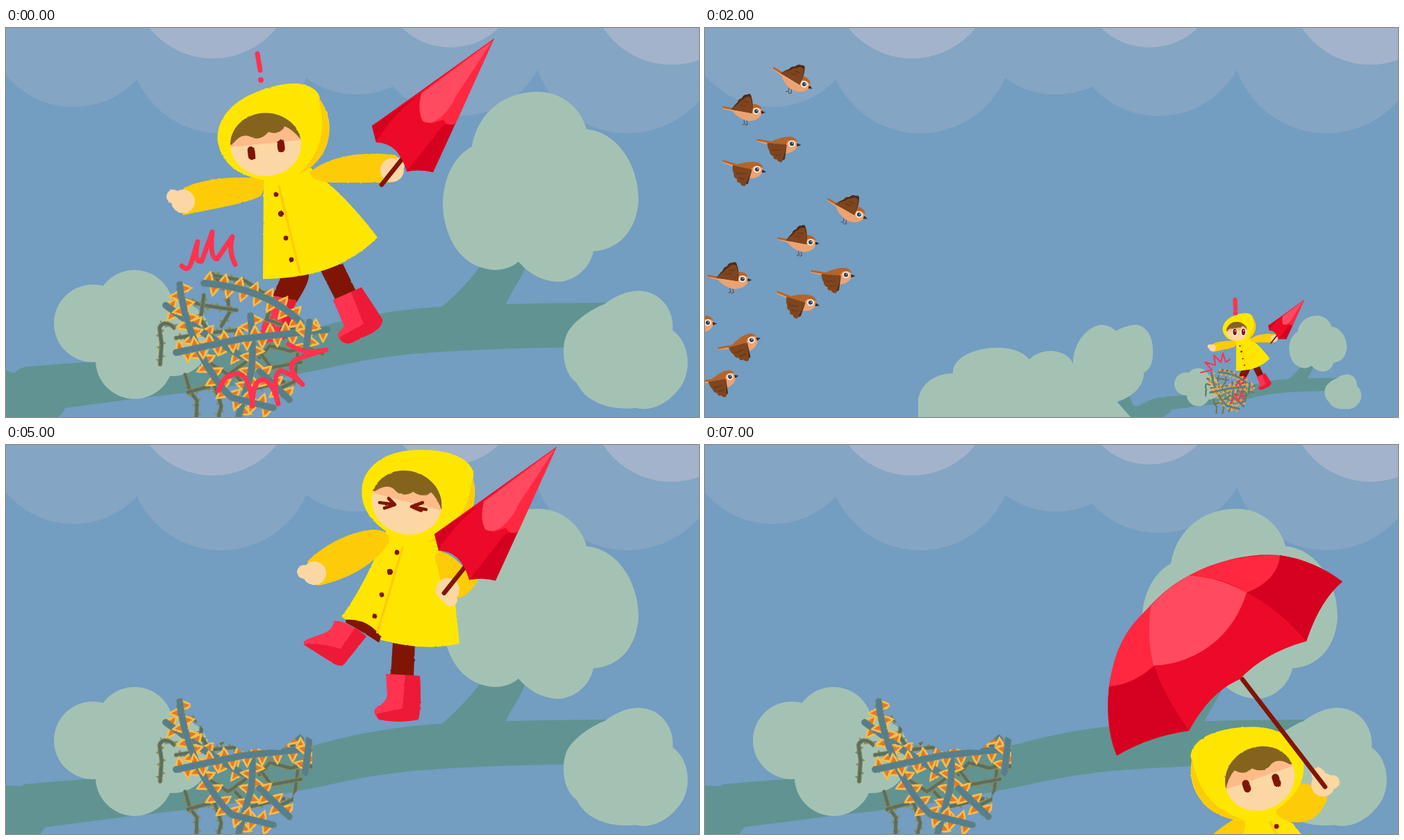
Write an HTML page that moves like this. It is 998 by 561 pixels and loops after 8000 ms.

```html
<!DOCTYPE html>
<html lang="en">
<head>
<meta charset="utf-8">
<title>Raincoat walk</title>
<style>
html, body { margin: 0; width: 100%; height: 100%; overflow: hidden; background: #739dc1; }
svg { display: block; width: 100vw; height: 100vh; }
</style>
</head>
<body>
<svg viewBox="0 0 998 561" preserveAspectRatio="none">
  <defs>
    <filter id="rough" x="-5%" y="-5%" width="110%" height="110%" color-interpolation-filters="sRGB">
      <feTurbulence type="fractalNoise" baseFrequency=".2" numOctaves="2" seed="4"/>
      <feDisplacementMap in="SourceGraphic" scale="2.2" xChannelSelector="R" yChannelSelector="G"/>
    </filter>
    <clipPath id="face"><ellipse cx="374" cy="168" rx="51" ry="45.5"/></clipPath>
    <clipPath id="kicked"><path d="M195 345L262 362 272 395 300 425 328 420 330 393 352 386 352 420 392 425 445 376 480 388 463 425 466 455 450 490 412 515 412 580 190 580Z"/></clipPath>
    <clipPath id="broken"><path d="M195 420L232 360 262 362 272 395 302 432 318 426 340 442 360 438 395 440 425 416 441 425 441 470 414 505 412 580 190 580Z"/></clipPath>
  </defs>
  <rect width="998" height="561" fill="#739dc1"/>
  <g id="clouds"></g>
  <g id="stage"></g>
</svg>
<script>
const NS = 'http://www.w3.org/2000/svg';
const YELLOW = '#ffe600', GOLD = '#fdcb08', SKIN = '#fbd7a3', MAROON = '#801505';
const PINK = '#ff3350', ROSE = '#ec1a36', LEAF = '#a4c2b4', BARK = '#619393';

const fill = (d, color) => `<path d="${d}" fill="${color}"/>`;
const line = (d, color, w) =>
  `<path d="${d}" fill="none" stroke="${color}" stroke-width="${w}" stroke-linecap="round" stroke-linejoin="round"/>`;
const disc = (x, y, r, color, ry = r) => `<ellipse cx="${x}" cy="${y}" rx="${r}" ry="${ry}" fill="${color}"/>`;
const group = (content, transform = '') => `<g transform="${transform}">${content}</g>`;

document.getElementById('clouds').innerHTML =
  '<rect width="998" height="60" fill="#84a5c3"/>' +
  [[97, -12, 126], [310, 18, 134], [505, -27, 123], [653, -2, 129], [895, 15, 137]]
    .map(c => disc(...c, '#84a5c3')).join('') +
  [[298, -73, 117], [640, -72, 100], [958, -64, 117]].map(c => disc(...c, '#a4b3cc')).join('');

// ---- branch and trees
const branchRest = 'Q110 482 200 476Q330 463 420 440C470 425 530 410 600 404Q690 397 870 396V460Q700 461 600 469C520 475 470 490 430 497Q330 520 190 534';
const branch = fill('M-205 516L-148 486Q-138 540-110 535L-60 510Q-30 495 0 491L20 492 28 489' + branchRest +
  'L57 551Q52 556 50 561L0 600H-150Z', BARK);
const branchStart = fill('M0 494L12 498Q20 488 35 488' + branchRest + 'L85 548Q82 556 75 561H0Z', BARK);

const trees =
  fill('M624 405C655 380 680 350 692 330H753C745 360 728 378 718 402Z', BARK) +
  fill('M766 92C800 92 828 115 836 146C881 150 911 198 911 248C908 295 880 320 846 322C840 350 815 366 795 366C765 364 750 350 738 337C725 348 710 349 703 349C650 345 629 295 629 250C631 215 645 185 671 171C677 130 710 92 766 92Z', LEAF) +
  disc(125, 426, 56, LEAF) + disc(185, 405, 56, LEAF) + disc(185, 479, 56, LEAF) + disc(240, 447, 55, LEAF) +
  fill('M912 379C945 380 963 410 960 436C987 455 988 500 968 522C950 545 925 553 907 548C870 552 835 540 822 512C798 495 799 450 812 434C825 417 845 405 862 398C880 385 895 379 912 379Z', LEAF);

const bush = fill('M307 561V535C312 510 335 498 357 498C355 478 385 460 425 461Q455 463 467 478C485 460 520 462 530 484C530 450 555 428 572 428Q584 429 592 437C603 430 615 428 622 428C640 432 646 450 645 470Q645 490 632 497C632 515 620 530 593 539L613 561Z', LEAF);

// ---- thorny nest
function walk(d, step, put) {
  const path = document.createElementNS(NS, 'path');
  path.setAttribute('d', d);
  const len = path.getTotalLength();
  let out = '';
  for (let s = step / 2, i = 0; s < len; s += step, i++) {
    const a = path.getPointAtLength(s), b = path.getPointAtLength(s + 1);
    const angle = Math.atan2(b.y - a.y, b.x - a.x) * 180 / Math.PI;
    out += group(put, `translate(${a.x.toFixed(1)} ${a.y.toFixed(1)}) rotate(${(angle + (i % 2 ? 180 : 0)).toFixed(1)})`);
  }
  return out;
}
const thorn = fill('M-8-3Q-4-11 2-19Q7-11 8-3Z', '#f5bd4b') + fill('M-4-4Q-1-9 1.5-14Q4-9 5-4Z', '#e0792a');
const spike = fill('M-3 0L2-7 4 0Z', '#8c8650');
const thick = d => walk(d, 11, thorn) + line(d, '#6f8478', 10) + line(d, '#567f8b', 8);
const thin = d => line(d, '#938b50', 6.5) + walk(d, 9, spike) + line(d, '#576f66', 4.5);

const twigs = [
  'M222 485L224 455 221 432Q228 420 242 432', 'M258 500L264 520 275 538 274 570', 'M262 525L300 515 310 545 304 570',
  'M310 430L322 410 318 380 298 355', 'M245 388L285 400 332 407', 'M365 475L380 458 410 466 430 460 456 470',
  'M420 470L415 510 390 522', 'M245 447L290 440 340 435', 'M360 460L382 490 425 482', 'M300 357L345 365 385 392',
  'M330 500L350 522 400 510', 'M285 478L320 500 345 482', 'M285 385L280 420 305 455', 'M385 390L375 420 430 440'
];
const vines = [
  'M230 400L285 440 340 474', 'M352 415Q358 470 352 500L335 560', 'M365 495L408 536',
  'M285 368Q375 375 425 425', 'M250 370Q256 420 278 465T325 533L385 548', 'M245 468L340 448 463 435', 'M437 424L431 472'
];
const nest = twigs.map(thin).join('') + vines.map(thick).join('');
const rough = (content, clip = '') => `<g${clip && ` clip-path="url(#${clip})"`}><g filter="url(#rough)">${content}</g></g>`;
const nestFull = rough(nest);
const nestBroken = rough(nest, 'broken');
const nestKicked = rough(nest + thick('M335 392L335 425') + thick('M400 432L464 384'), 'kicked') +
  rough(thin('M268 340L272 312 300 293 326 300') + thick('M272 326L325 296') + thin('M308 345L320 356 333 370') +
    thin('M297 374L296 388'));

// ---- child
const hair = 'M310 100H440V160L424 160Q412 146 402 142Q393 155 378 150Q365 165 350 156Q337 152 326 168L310 170Z';
const dotEyes = line('M353 176L354 185M395.5 166L396.5 174', MAROON, 10.5);
const wideEyes = [364, 406].map(x => disc(x, 172, 13, '#fff', 20) + disc(x, 172, 9, MAROON, 16) + disc(x + 2, 166, 3, '#fff')).join('');

function head(x, y, turn, flip, eyes) {
  return group(
    fill('M305 165C302 138 318 113 350 97C375 85 400 79 420 80C440 82 452 92 452 103C467 125 469 147 462 168C455 188 440 202 425 211C405 224 385 224 365 218C340 213 312 200 305 165Z', YELLOW) +
    fill('M450 101C470 128 470 165 452 187Q442 202 420 212C455 180 462 145 450 101Z', GOLD) +
    `<g clip-path="url(#face)">${disc(374, 168, 52, SKIN)}${fill('M310 100H440V160L320 172Z', '#fdbb89')}${fill(hair, '#84641d')}</g>` +
    eyes, `translate(${x} ${y}) rotate(${turn}) scale(${flip} 1) translate(-374 -168)`);
}

const buttons = pts => pts.map(([x, y], i) => disc(x, y, i === 1 ? 4.2 : 3.4, MAROON)).join('');
const hand = (x, y, tx, ty) => disc(x, y, 17, SKIN) + disc(tx, ty, 10, SKIN);

const handle = d => line(d, MAROON, 6.5);
const canopy =
  fill('M703 15L527 141L533 165Q565 165 577 207Q595 203 615 208Z', '#ec0a28') +
  fill('M600 93L527 141 533 164Q560 120 600 93Z', '#d60020') +
  fill('M630 140L577 207Q595 203 615 208L648 136Z', '#d60020') +
  fill('M703 15L598 93Q592 130 612 138L630 132Q636 144 648 137Z', '#ff2840') +
  fill('M700 19L598 95Q592 118 600 134Q610 141 626 129Q642 114 648 98Z', '#ff4a60');
const umbrella = handle('M572 187L541 226') + canopy;
const raised = handle('M698 236L729 281') +
  group(canopy, 'translate(577 63) rotate(6.6) scale(-.99 1) translate(-703 -15)');

const openUmbrella =
  handle('M774 338L893 493') +
  fill('M593 448C580 420 578 380 582 348C590 290 640 215 700 187C740 165 790 155 828 159Q875 165 918 197Q885 225 866 283Q805 300 770 338Q728 355 697 412Q640 420 593 448Z', '#ec0a28') +
  fill('M582 348Q620 345 647 318Q660 360 697 412Q640 420 593 448Q576 400 582 348Z', '#d60020') +
  fill('M780 213Q825 195 828 159Q880 168 918 197Q885 225 866 283Q825 235 780 213Z', '#d60020') +
  fill('M582 348C590 290 610 260 642 232Q638 280 647 318Q615 346 582 348Z', '#ff2840') +
  fill('M697 188Q750 158 828 159Q825 195 780 213Q745 190 697 188Z', '#ff2840') +
  fill('M642 232Q665 205 697 188Q740 190 780 213Q755 290 680 313Q660 318 646 318Q636 280 642 232Z', '#ff4a60');

const startled = eyes => rough(
  fill('M397 357L436 354Q438 366 418 396L384 386Z', MAROON) +
  fill('M385 386L418 393 410 430Q414 445 400 449L372 455Q362 445 370 425Z', PINK) +
  fill('M404 391L418 393 410 430 414 444 390 452Z', ROSE) +
  fill('M453 350L485 340 504 379 475 393Z', MAROON) +
  fill('M471 392L512 374 542 420Q544 430 527 440L495 455Q479 455 478 441L487 430Z', PINK) +
  fill('M497 381L512 374 542 420Q544 430 527 440L495 455Q483 455 480 446L515 427Z', ROSE) +
  fill('M371 220L437 200 465 225Q495 250 535 302Q510 328 470 345Q430 361 370 362Z', YELLOW) +
  line('M393 228L423 352', GOLD, 3.5) +
  buttons([[389, 240], [396, 268], [403, 303], [411, 334]]) +
  fill('M370 218C340 212 280 217 256 231Q248 245 255 270C300 260 345 254 367 242Q374 230 370 218Z', GOLD) +
  hand(255, 250, 241, 243) +
  fill('M437 208C470 182 520 178 560 183Q573 190 570 205 566 222 552 223H470Q440 222 437 208Z', GOLD) +
  hand(556, 205, 564, 197) + head(374, 168, 0, 1, eyes)) + umbrella;

const kicking = rough(
  fill('M510 330L542 332 540 380H507Z', MAROON) +
  fill('M500 376L549 379Q552 420 547 442Q520 448 490 442Q480 432 485 425Q500 418 502 408Z', PINK) +
  fill('M528 378L549 379Q552 420 547 442Q520 448 490 442L486 434 524 426Z', ROSE) +
  fill('M502 165L575 175Q585 220 600 275L606 332Q560 345 492 327L436 294Q475 240 502 165Z', YELLOW) +
  fill('M442 298Q475 296 493 323L490 331Q465 314 442 302Z', MAROON) +
  fill('M425 300Q440 297 472 322L440 362Q434 368 420 358L382 334Q378 330 390 325L412 317Q424 312 425 300Z', PINK) +
  fill('M456 309L472 322 440 362Q434 368 420 358L382 334Q400 330 435 340Z', ROSE) +
  line('M524 194L488 316', GOLD, 3.5) +
  buttons([[516, 201], [506, 229], [494, 262], [484, 293]]) +
  fill('M504 186Q508 168 480 168C440 172 402 198 387 214L402 249C445 240 486 218 504 186Z', GOLD) +
  hand(397, 231, 382, 229) +
  fill('M570 206Q582 190 612 222L633 240Q620 265 602 267L580 245Z', GOLD) +
  hand(589, 255, 593, 269) + head(530, 129, 20, 1, '') +
  line('M491 129L513 132M504 123L513 132 498 137M558 139L537 135M553 129L537 135 551 141', MAROON, 4.6)) +
  group(umbrella, 'translate(43 33.5)');

const strolling = rough(
  fill('M651 475L690 465 692 514 657 520Z', MAROON) +
  fill('M650 518L695 511 700 540Q722 545 721 561V578H650Z', PINK) +
  fill('M650 518L674 515 680 550 706 561V578H650Z', ROSE) +
  fill('M707 456L742 426 764 459 730 483Z', MAROON) +
  fill('M731 485L765 458 785 485 808 488Q816 495 808 503L775 532Q765 538 758 530Z', PINK) +
  fill('M731 485L746 473 768 505 810 500 775 532Q765 538 758 530Z', ROSE) +
  fill('M603 320L650 312 678 332Q714 376 749 420Q735 440 700 455Q650 480 586 483Q586 400 596 350Z', YELLOW) +
  line('M648 333L704 445', GOLD, 3.5) +
  buttons([[657, 339], [670, 366], [687, 396], [701, 425]]) +
  fill('M612 338Q612 322 595 329C560 350 530 385 518 407L546 433C580 410 605 372 612 338Z', GOLD) +
  hand(531, 421, 516, 424) +
  fill('M657 321L655 300 685 275 710 280Q736 294 728 305Q715 332 690 333Q670 335 657 321Z', GOLD) +
  hand(724, 279, 738, 275) + disc(717, 264, 10, SKIN) +
  head(633, 270, -25, -1, dotEyes));

// ---- red alarm marks
const bang1 = line('M362 37L366 61', PINK, 7) + disc(367, 75, 4, PINK) +
  line('M253 343Q262 353 267 338L276 308Q270 340 282 336L297 294Q293 333 304 333L326 301Q320 322 330 341', PINK, 7) +
  line('M306 523Q314 497 337 499Q352 505 355 545Q355 505 372 507Q386 515 392 542Q382 500 396 494Q410 498 427 514Q396 484 425 475L461 464Q430 472 407 456', PINK, 7);
const bang2 = line('M365 14L367 60', PINK, 21) + disc(367, 80, 11, PINK) +
  line('M198 371L252 357 218 320 269 334 262 286 296 320 306 276 320 320 340 306', PINK, 7) +
  line('M347 517L367 476 381 510 398 462 408 503', PINK, 7);
const bang3 = line('M264 347L276 364 279 320 296 352 313 307 321 335 363 274 347 325', PINK, 5) +
  line('M339 435L342 480 360 416 381 495 388 420 405 457 388 405 437 430 391 393', PINK, 5);

// ---- birds: eye and tail tip for both flight moments, eye first
const flock = [
  [143, 81, 98, 57, 227, 87, 178, 63], [74, 120, 25, 114, 139, 119, 83, 109],
  [125, 167, 74, 161, 192, 167, 130, 156], [75, 204, 25, 191, 125, 196, 67, 179],
  [222, 269, 176, 246, 320, 274, 254, 248], [152, 309, 104, 303, 222, 309, 155, 294],
  [203, 356, 152, 350, 297, 360, 222, 348], [152, 396, 103, 380, 227, 393, 157, 372],
  [54, 362, 3, 357, 93, 348, 36, 336], [4, 425, -46, 420, 46, 409, 11, 425],
  [67, 450, 18, 462, 119, 438, 72, 450], [36, 503, -10, 510, 98, 494, 58, 502]
];
const wingUp = line('M-18 13L-17 18-20 19M-14 14L-13 19-16 20', '#55555c', 1.2) +
  fill('M-36-3Q-31-10-27-13Q-26-18-21-19Q-18-25-13-24Q-8-27-7-21Q-4-12-6 3Z', '#4f2a15') +
  fill('M-36-3Q-30-9-25-12Q-22-17-19-17Q-15-22-11-21L-8-20Q-5-10-6 3Z', '#7f451e') +
  line('M-23-9q2 3 4 0q2 3 4 0M-19-14q2 3 4 0q2 3 4 0', '#55300f', .8);
const wingDown = fill('M-14 24L-10 22-7 2-14 4Z', '#4f2a15') +
  fill('M-34-2L-7 1Q-10 15-14 26Q-19 27-21 22Q-26 23-26 17Q-31 16-31 10Q-34 6-34-2Z', '#7f451e') +
  line('M-28 8q2 3 4 0q2 3 4 0q2 3 4 0M-23 15q2 3 4 0q2 3 4 0', '#55300f', .8);

function bird(row, at, i) {
  const [x, y, tx, ty] = row.slice(at, at + 4);
  const turn = Math.atan2(y - ty, x - tx) * 180 / Math.PI - 7.6;
  const stretch = Math.hypot(x - tx, y - ty) / 49.4;
  const up = i % 4 < 2 && i < 10;
  return group(
    fill('M-49-8L-28-3Q-10-9 0-9Q9-7 8 3Q4 14-12 14Q-26 11-34 0L-48-4Z', '#eca373') +
    fill('M-49-8L-28-4Q-10-12 0-10Q7-8 8-2Q2-7-5-4L-8 1-34-2-48-5Z', '#b5642a') +
    fill('M7-1L13 2 7 4Z', '#3a2b28') + (up ? wingUp : wingDown) +
    disc(0, 0, 4.8, '#f6efe6') + disc(0, 0, 3, '#3b3d45') + disc(1, -1, .8, '#fff'),
    `translate(${x} ${y}) rotate(${turn.toFixed(1)}) scale(${stretch.toFixed(3)} 1)`);
}
const birds = at => flock.map((row, i) => bird(row, at, i)).join('');

// ---- scenes, one second each
const land = branch + trees;
const alarm = land + startled(wideEyes) + nestFull + bang2;
const wide = at => group(alarm, 'translate(655.6 387.6) scale(.295)') + bush + birds(at);
const scenes = [
  branchStart + trees + startled(dotEyes) + nestFull + bang1,
  alarm,
  wide(0),
  wide(4),
  land + nestKicked + kicking + bang3,
  land + nestBroken + group(kicking, 'translate(47 -46)'),
  land + nestBroken + strolling + raised,
  land + nestBroken + group(strolling, 'translate(166 211)') + openUmbrella
];

const stage = document.getElementById('stage');
stage.innerHTML = scenes.map(s => `<g display="none">${s}</g>`).join('');
let start = null, shown = -1;

function draw(t) {
  const now = Math.floor(t / 1000) % scenes.length;
  if (now === shown) return;
  [...stage.children].forEach((g, i) => g.setAttribute('display', i === now ? 'inline' : 'none'));
  shown = now;
}
function tick(now) {
  start ??= now;
  draw(now - start);
  requestAnimationFrame(tick);
}
draw(0);
requestAnimationFrame(tick);
</script>
</body>
</html>
```
